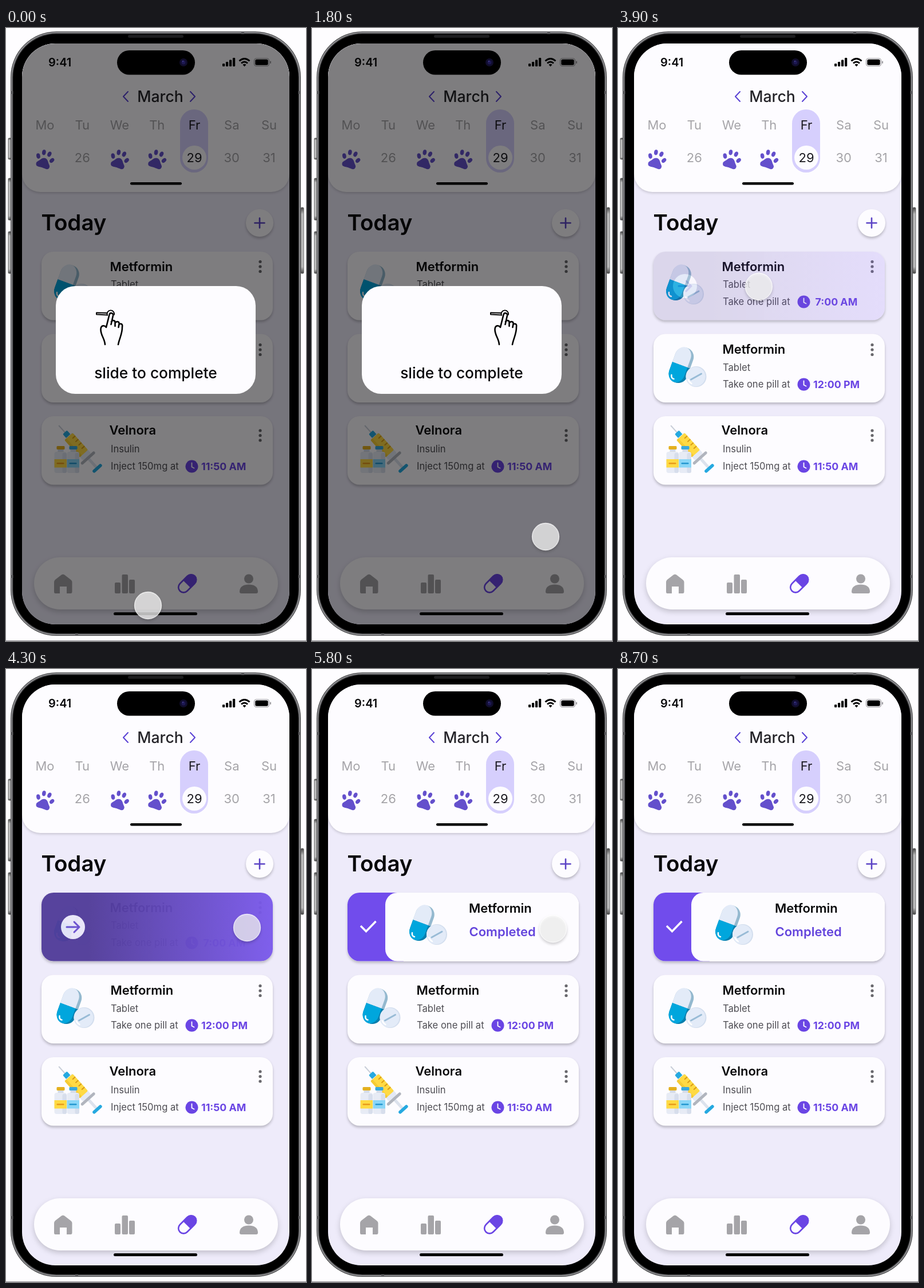
Animation, 524 px wide and 1069 px high, one loop 8800 ms. Source, as an HTML page:

```html
<!DOCTYPE html>
<html lang="en">
<head>
<meta charset="utf-8">
<title>Medication reminder</title>
<style>
  html, body { margin: 0; width: 100%; height: 100%; overflow: hidden; background: #fefdff; }
  svg { display: block; width: 524px; height: 1069px; font-family: Inter, "Liberation Sans", sans-serif; }
  .soft { filter: drop-shadow(0 3px 2px rgba(0, 0, 0, .22)); }
  .faint { filter: drop-shadow(0 2px 2px rgba(0, 0, 0, .16)); }
  .lift { filter: drop-shadow(0 4px 5px rgba(0, 0, 0, .18)); }
  .line { fill: none; stroke-linecap: round; stroke-linejoin: round; }
</style>
</head>
<body>
<svg id="stage" viewBox="0 0 524 1069"></svg>
<script>
const WHITE = '#fdfcff', PURPLE = '#6a45e4', DONE = '#714cec', GREY = '#a5a4a8';

const rect = (x, y, w, h, r, fill, more = '') =>
  `<rect x="${x}" y="${y}" width="${w}" height="${h}" rx="${r}" fill="${fill}" ${more}/>`;
const disc = (x, y, r, fill, more = '') =>
  `<circle cx="${x}" cy="${y}" r="${r}" fill="${fill}" ${more}/>`;
const line = (d, color, w) => `<path class="line" d="${d}" stroke="${color}" stroke-width="${w}"/>`;
const shape = (d, fill) => `<path d="${d}" fill="${fill}"/>`;
const text = (s, x, y, size, weight, fill = '#08080a', anchor = 'start') =>
  `<text x="${x}" y="${y}" font-size="${size}" font-weight="${weight}" fill="${fill}" text-anchor="${anchor}">${s}</text>`;
const at = (x, y, body, more = '') => `<g transform="translate(${x} ${y}) ${more}">${body}</g>`;
const layer = (id, body) => `<g id="${id}">${body}</g>`;

function phone() {
  const keys = [[4, 192, 37], [4, 262, 73], [4, 355, 73], [515, 313, 115]];
  const bands = [[8, 110, 5, 5], [510, 110, 5, 5], [8, 954, 5, 5], [510, 954, 5, 5], [411, 6.5, 5, 5], [121, 1055, 5, 5]];
  return keys.map(([x, y, h]) => rect(x, y, 5, h, 1.5, 'url(#steel)', 'stroke="#555" stroke-width=".8"')).join('')
    + rect(8, 6, 507, 1054, 80, '#4a4a4c')
    + rect(9.3, 7.3, 504.4, 1051.4, 78.7, '#97979a')
    + rect(11, 9, 501, 1048, 77, '#3a3a3c')
    + bands.map(b => rect(...b, 0, '#5c5c5f')).join('')
    + rect(12.5, 10.5, 498, 1045, 75.5, '#000')
    + rect(213, 12, 97, 5, 2.5, '#1d1d1f')
    + rect(0, 1068, 524, 1, 0, '#8b8a8d');
}

function status() {
  const bars = [5, 8, 11.5, 15].map((h, i) => rect(378 + i * 6, 67 - h, 4.2, h, 1.2, '#000')).join('');
  return text('9:41', 74, 67, 20, 600) + bars
    + `<g class="line" stroke="#000" stroke-width="3" style="stroke-linecap:butt">
        <path d="M407.5 57.5Q416.5 49.5 425.5 57.5M411 61.5Q416.5 56.5 422 61.5"/></g>`
    + shape('M413.5 64Q416.5 61.5 419.5 64L416.5 67.3Z', '#000')
    + rect(433.5, 53, 26, 13.5, 4, 'none', 'stroke="#9a999d" stroke-width="1.2"')
    + rect(435.3, 54.8, 22.4, 9.9, 2.5, '#000')
    + rect(461, 57.5, 2, 4.5, 1, '#9a999d');
}

const island = () => rect(194, 39, 136, 42.5, 21.2, '#000')
  + disc(310, 60, 7, '#100d2c') + disc(310, 60, 3.5, '#1d1852') + disc(309, 58, 1.3, '#3d3782');

const toe = (x, y, tilt) => `<ellipse cx="${x}" cy="${y}" rx="3.3" ry="4.7" transform="rotate(${tilt} ${x} ${y})"/>`;
const paw = x => at(x, 228, `<g fill="#6450cc">
    <path d="M0 -1C4 -1 6 2 8 5C10 8 13 9 12 13C11 18 5 16 0 16S-11 18 -12 13C-13 9 -10 8 -8 5C-6 2 -4 -1 0 -1Z"/>
    ${toe(-12.5, -1, -28)}${toe(-5, -10, -8)}${toe(5, -10, 8)}${toe(12.5, -1, 28)}</g>`, 'rotate(18)');

function calendar() {
  const days = ['Mo', 'Tu', 'We', 'Th', 'Fr', 'Sa', 'Su'], dates = ['', 26, '', '', 29, 30, 31];
  const cols = days.map((day, i) => {
    const x = 68 + i * 65.25, color = i == 4 ? '#1b1a20' : GREY;
    return text(day, x, 177, 22, 400, color, 'middle')
      + (dates[i] ? text(dates[i], x, 234, 22, 400, color, 'middle') : paw(x));
  }).join('');
  return `<g class="faint">${shape('M28 20H495V254A32 32 0 0 1 463 286H60A32 32 0 0 1 28 254Z', WHITE)}</g>`
    + text('March', 269.5, 128.5, 26.6, 500, '#252429', 'middle')
    + line('M213 111L205 119.5L213 128M322 111L330 119.5L322 128', '#5b43d5', 2)
    + rect(304, 142, 49, 110, 24.5, '#d6cffd') + disc(329, 226, 21, WHITE) + cols
    + rect(217, 269, 90, 4.5, 2.2, '#000');
}

// Capsule and tablet, drawn around the capsule centre.
const pills = (x, y) => at(x, y,
  at(0, 0, rect(-16.5, -32, 33, 64, 16.5, '#94b9cf')
    + shape('M-16.5 0H16.5V15.5A16.5 16.5 0 0 1 -16.5 15.5Z', '#087fae')
    + shape('M-16.5 0V-15.5A14 16.5 0 0 1 11.5 -15.5V0Z', '#e3ebf8')
    + shape('M-16.5 0H11.5V15.5A14 16.5 0 0 1 -16.5 15.5Z', '#00a6dd'), 'rotate(20)')
  + disc(26, 20, 18, '#d3deee') + disc(25, 20, 17, '#e3ebf8')
  + line('M17 25L35 15', '#98bbd6', 3)
  + line('M-17 17Q-18 23 -13 24M12 25Q14 30 18 32', '#fff', 2.5));

function vial(x, cap, label, dash) {
  return rect(x + 4, 729, 14, 6, 1.5, cap) + rect(x + 6, 735, 10, 6, 0, '#d4dbe8')
    + rect(x, 739, 21.5, 37, 4, '#e7ebf5') + rect(x + 14, 741, 7.5, 35, 3, '#d7deec')
    + rect(x, 752, 21.5, 14.5, 0, label) + rect(x + 4, 758, 13, 2.5, 1.2, dash);
}

const syringe = () => at(92, 693,
  rect(0, -1, 20, 2, 1, '#c9ced9') + rect(16, -5, 10, 10, 2, '#25a9e0')
  + rect(25, -9.5, 49, 19, 3, '#e4e9f4') + rect(26, -9.5, 40, 19, 2, '#ffda44') + rect(26, 5, 40, 4.5, 1, '#f6cb33')
  + [32, 40, 48, 56].map(x => rect(x, -9.5, 2, 7, 1, '#d99a16')).join('')
  + rect(74, -2.5, 26, 5, 0, '#dce2ed') + rect(74, -16, 5, 32, 2.5, '#b1b5be')
  + rect(98, -10, 5.5, 20, 2.5, '#25a9e0'), 'rotate(48)')
  + vial(84.5, '#e4b01f', '#ffda44', '#e89a1c') + vial(106.5, '#3aa9dc', '#8ad6f7', '#2497d0');

const clock = (x, y) => disc(x, y, 11, PURPLE) + line(`M${x} ${y - 6}V${y + 1}L${x + 4} ${y + 3}`, '#fff', 1.8);
const dots = y => [-8.5, 0, 8.5].map(d => disc(444, y + d, 2.6, '#69686d')).join('');
const panel = (y, fill) => rect(62, y, 404, 119.5, 21, fill);

function card(y, icon, name, kind, dose, time, o) {
  return `<g class="soft">${panel(y, WHITE)}</g>` + icon
    + text(name, o.name[0], o.name[1], 22, 600)
    + text(kind, 183, o.kind, 16.6, 400, '#4e4d53') + text(dose, 183, o.dose, 16.6, 400, '#4e4d53')
    + clock(324.5, o.dose - 5.5) + text(time, o.time, o.dose + 1, 17.8, 700, PURPLE) + dots(o.dots);
}

const slider = () => panel(390, 'url(#sweep)') + disc(117, 450, 21, '#eae6f8')
  + line('M106 450H128M119 441L128 450L119 459', '#6a4fcf', 3);

const finished = () => panel(390, DONE) + disc(115, 451, 21, '#fff')
  + `<path d="M106 451L113 458L125 444" fill="none" stroke="${DONE}" stroke-width="4.5"/>`
  + text('Completed', 172, 464, 39, 600, '#fff');

const doneCard = () => panel(390, WHITE)
  + shape('M160 390H83A21 21 0 0 0 62 411V488.5A21 21 0 0 0 83 509.5H160Z', DONE)
  + rect(128, 390, 338, 119.5, 21, WHITE)
  + `<path d="M85 448L94.5 457.5L111.5 440" fill="none" stroke="#fff" stroke-width="3.5"/>`
  + pills(192, 443) + text('Metformin', 274, 425, 22, 600) + text('Completed', 274.5, 466, 22, 600, '#6344dc');

function nav() {
  return `<g class="lift">${rect(49, 923, 426, 91, 45.5, WHITE)}</g><g fill="${GREY}">`
    + `<path d="M84 966Q84 964 86 962L97 953.5Q99.5 952 102 953.5L113 962Q115.5 964 115.5 966V983Q115.5 986 113 986H106V974H94V986H86Q84 986 84 983Z"/>`
    + `<rect x="190" y="967" width="10" height="19" rx="2"/><rect x="202.5" y="953" width="10.5" height="33" rx="2"/><rect x="215" y="962" width="10" height="24" rx="2"/>`
    + `<circle cx="424" cy="960.5" r="8"/><path d="M408 983C408 974 415 970.5 424 970.5S440 974 440 983Q440 986 437 986H411Q408 986 408 983Z"/></g>`
    + at(316.5, 969, rect(-18, -9, 36, 18, 9, 'none', `stroke="${PURPLE}" stroke-width="2.6"`)
      + shape('M-1 -10H10A10 10 0 0 1 10 10H-1Z', PURPLE), 'rotate(-45)')
    + rect(188, 1019, 146, 5, 2.5, '#000');
}

const hand = () => line('M173 552C172 540 165 536 165.5 525C166 518 172 518 175 522L180.5 500C181.5 495.5 188 496.5 187 501.5L183.5 517'
    + 'M184 512C187 508.5 191 510 190.5 514V520M191 514C194 510.5 198 512 197.5 516L196.5 522M197.5 517C201 514 204 517 203 521C203.5 533 198 541 196 552', '#000', 2.6)
  + line('M176 497L158 496.5V499.5L177 500.5M177 501A6.3 6.3 0 1 1 189 500', '#000', 1.9);

const modal = () => rect(28, 27, 467, 1013, 58, '#000', 'opacity=".5"')
  + rect(87, 450, 349, 188, 34, WHITE) + layer('hand', hand())
  + text('slide to complete', 261.5, 611, 26.3, 500, '#08080a', 'middle');

stage.innerHTML = `<defs>
    <clipPath id="screen">${rect(28, 27, 467, 1013, 58, '#000')}</clipPath>
    <linearGradient id="sweep"><stop offset=".2" stop-color="#513c99"/><stop offset="1" stop-color="#7a59eb"/></linearGradient>
    <linearGradient id="steel" x2="0" y2="1"><stop stop-color="#444"/><stop offset=".1" stop-color="#bbb"/>
      <stop offset=".9" stop-color="#bbb"/><stop offset="1" stop-color="#444"/></linearGradient>
  </defs>`
  + phone()
  + `<g clip-path="url(#screen)">` + rect(28, 27, 467, 1013, 0, '#eeebfa') + calendar() + status()
  + text('Today', 61.5, 353, 38.5, 600)
  + `<g class="soft">${disc(443, 340, 24, WHITE)}</g>` + line('M434.5 340H451.5M443 331.5V348.5', '#5b43c5', 2.6)
  + card(390, pills(106, 444), 'Metformin', 'Tablet', 'Take one pill at', '7:00 AM',
      { name: [181.5, 424], kind: 453, dose: 483, time: 344.5, dots: 416 })
  + layer('slider', slider()) + layer('finished', finished()) + layer('doneCard', doneCard())
  + card(533.5, pills(110.5, 588), 'Metformin', 'Tablet', 'Take one pill at', '12:00 PM',
      { name: [182.5, 567.5], kind: 598, dose: 627, time: 341, dots: 561 })
  + card(677, syringe(), 'Velnora', 'Insulin', 'Inject 150mg at', '11:50 AM',
      { name: [180.5, 708.5], kind: 740, dose: 770, time: 341, dots: 710.5 })
  + nav() + layer('modal', modal()) + '</g>' + island()
  + layer('touch', `<g class="soft">${disc(0, 0, 23.5, 'rgba(247,247,247,.75)', 'stroke="#fff" stroke-opacity=".75" stroke-width="1.3"')}</g>`);

const LOOP = 8800;
const ramp = (t, a, b) => Math.min(1, Math.max(0, (t - a) / (b - a)));
const ease = k => k * k * (3 - 2 * k);
const el = id => document.getElementById(id);
const fade = (id, k) => {
  el(id).style.opacity = k;
  el(id).style.display = k > 0 ? '' : 'none';
};

// Touch path: time, x, y
const path = [[0, 248, 1007], [1800, 408, 887], [2000, 408, 887], [2900, 288, 564], [3450, 100, 451],
  [3650, 100, 451], [4200, 421, 451], [5500, 421, 451], [5800, 421, 453], [LOOP, 421, 453]];

function touchAt(t) {
  const i = path.findIndex(p => p[0] > t), [a, x, y] = path[i - 1], [b, u, v] = path[i];
  const k = ramp(t, a, b);
  return [x + (u - x) * k, y + (v - y) * k];
}

function draw(now) {
  const t = Math.floor(now % LOOP / 100) * 100;
  const filled = ramp(t, 4500, 4800), settled = ramp(t, 5450, 5800);
  el('hand').setAttribute('transform', `translate(${154 * ease(ramp(t, 0, 1800))} 0)`);
  el('touch').setAttribute('transform', `translate(${touchAt(t)})`);
  fade('modal', 1 - ramp(t, 2000, 2300));
  // A covered layer is dropped so its colour does not fringe the edges.
  fade('slider', filled < 1 ? ramp(t, 3800, 4320) : 0);
  fade('finished', settled < 1 ? filled : 0);
  fade('doneCard', settled);
  fade('touch', 1 - ramp(t, 6400, 6700));
  requestAnimationFrame(draw);
}
draw(0);
</script>
</body>
</html>
```
